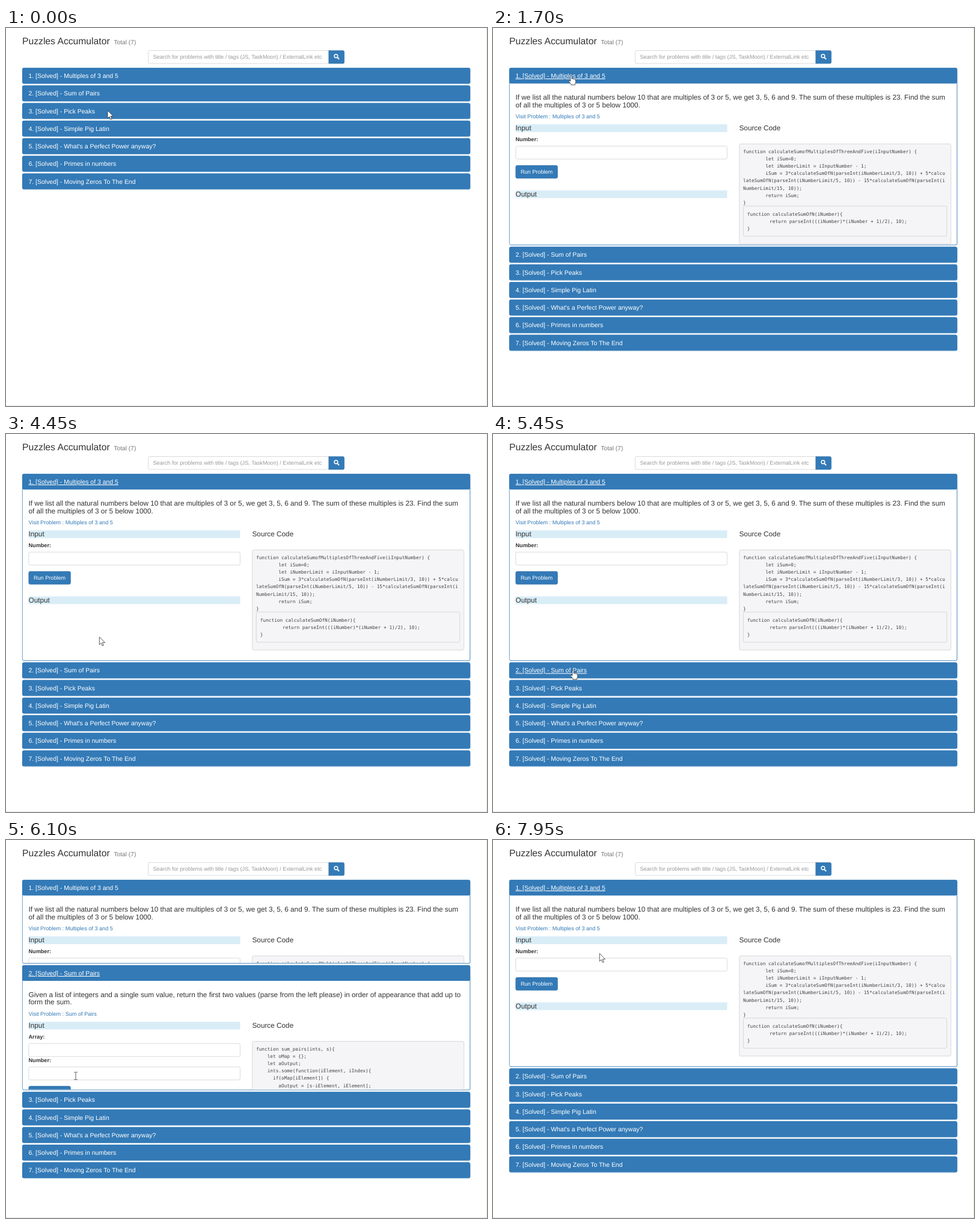
An HTML page that plays this animation: 800x628 px, repeating every 8 s.

```html
<!DOCTYPE html>
<html lang="en">
<head>
<meta charset="utf-8">
<title>Puzzles Accumulator</title>
<style>
html, body { margin: 0; width: 100%; height: 100%; overflow: hidden; background: #fff; }
svg { display: block; }
text { font: 9.15px "Liberation Sans", Arial, sans-serif; fill: #333; white-space: pre; text-rendering: geometricPrecision; }
.big { font-size: 15.7px; }
.small { font-size: 10.2px; fill: #777; }
.hint { fill: #999; }
.head { font-size: 10.46px; fill: #fff; }
.lead { font-size: 11.77px; }
.link { fill: #337ab7; }
.label { font-weight: bold; }
.white { fill: #fff; text-anchor: middle; }
.code { font: 7.76px "DejaVu Sans Mono", monospace; fill: #444; }
.field { fill: #fff; stroke: #ccc; stroke-width: .7; }
.pre { fill: #f5f4f6; stroke: #ccc; stroke-width: .7; }
.blue { fill: #337ab7; stroke: #2e6da4; stroke-width: .6; }
.shade { fill: #bfd2e4; }
.panel { fill: #fff; stroke: #337ab7; stroke-width: .7; }
.bar { fill: #337ab7; }
.band { fill: #d9edf7; }
.cursor path { fill: #fff; stroke: #333; stroke-width: .8; stroke-linejoin: round; }
</style>
</head>
<body>
<svg id="stage" width="800" height="628" viewBox="0 0 800 628"></svg>
<script>
const TOP = 66.2, PITCH = 29.25, BAR = 26, LINE = 12.14, LOOP = 8000;

const text = (x, y, cls, s) => `<text x="${x}" y="${y}" class="${cls}">${s}</text>`;
const rect = (x, y, w, h, cls, r = 2.6) =>
  `<rect x="${x}" y="${y}" width="${w}" height="${h}" rx="${r}" class="${cls}"/>`;
const code = (x, y, src) =>
  src.split("\n").map((s, i) => text(x, y + i * LINE, "code", s)).join("");

function body(name, lead, labels, source) {
  const drop = (labels.length - 1) * 38.7;
  return lead.map((s, i) => text(37.5, 118.6 + i * 12.9, "lead", s)).join("") +
    text(37.5, 149.6, "link", "Visit Problem : " + name) +
    rect(37.5, 160, 352, 12.9, "band", 0) + text(37.5, 170.2, "lead", "Input") +
    text(409.5, 170.2, "lead", "Source Code") +
    labels.map((s, i) => text(37.5, 188.3 + i * 38.9, "label", s) +
      rect(37.8, 196.2 + i * 38.9, 351.6, 21.6, "field")).join("") +
    rect(37.8, 228.3 + drop, 69.6, 21.4, "blue") +
    text(72.6, 242.2 + drop, "white", "Run Problem") +
    rect(37.5, 269.7 + drop, 352, 12.9, "band", 0) +
    text(37.5, 279.9 + drop, "lead", "Output") + source;
}

const sumCode = rect(409.7, 192.6, 352, 166.4, "pre") + code(416, 207.9,
`function calculateSumofMultiplesOfThreeAndFive(iInputNumber) {
        let iSum=0;
        let iNumberLimit = iInputNumber - 1;
        iSum = 3*calculateSumOfN(parseInt(iNumberLimit/3, 10)) + 5*calcu
lateSumOfN(parseInt(iNumberLimit/5, 10)) - 15*calculateSumOfN(parseInt(i
NumberLimit/15, 10));
        return iSum;
}`) + rect(416.3, 295.8, 338.4, 50.2, "pre") + code(422.8, 311.9,
`function calculateSumOfN(iNumber){
        return parseInt(((iNumber)*(iNumber + 1)/2), 10);
}`);

const pairCode = rect(409.7, 192.6, 352, 182.5, "pre") + code(416, 207.9,
`function sum_pairs(ints, s){
    let oMap = {};
    let aOutput;
    ints.some(function(iElement, iIndex){
      if(oMap[iElement]) {
        aOutput = [s-iElement, iElement];
        return aOutput;
      } else {
        oMap[s-iElement] = 1;
      }
    });

    return aOutput;
}`);

const names = ["Multiples of 3 and 5", "Sum of Pairs", "Pick Peaks", "Simple Pig Latin",
  "What's a Perfect Power anyway?", "Primes in numbers", "Moving Zeros To The End"];
const bodies = [
  body(names[0], ["If we list all the natural numbers below 10 that are multiples of 3 or 5, we get 3, 5, 6 and 9. The sum of these multiples is 23. Find the sum",
    "of all the multiples of 3 or 5 below 1000."], ["Number:"], sumCode),
  body(names[1], ["Given a list of integers and a single sum value, return the first two values (parse from the left please) in order of appearance that add up to",
    "form the sum."], ["Array:", "Number:"], pairCode)
];
const fullHeight = [284.1, 300.1];

const shapes = {
  arrow: "M0 0V13L3 10.3L5 15L7 14.2L5 9.6H9.2Z",
  hand: "M-1.2 9.4V1.2A1.2 1.2 0 0 1 1.2 1.2V5.5Q3 4.6 3.6 6Q5.4 5.2 6 6.8Q7.6 6.4 7.6 8V10.5Q7.4 12.5 6.4 14V15.5H-.2V14.3L-4 9.5Q-4 7.6 -2.2 8.4Z",
  beam: "M-3 -5.6H-.7L0 -5L.7 -5.6H3M0 -5V6M-3 6.6H-.7L0 6L.7 6.6H3"
};

const stage = document.getElementById("stage");
stage.innerHTML =
  rect(798.6, 0, 1.4, 628, "", 0).replace("<rect", '<rect fill="#efefe2"') +
  rect(0, 627, 800, 1, "", 0).replace("<rect", '<rect fill="#e6e6e6"') +
  text(27, 27, "big", "Puzzles Accumulator") + text(179.5, 27, "small", "Total (7)") +
  rect(236.5, 37.5, 303, 21.4, "field") +
  `<svg width="526.5" height="628">${text(244.5, 51.2, "hint",
    "Search for problems with title / tags (JS, TaskMoon) / ExternalLink etc")}</svg>` +
  '<path class="blue" d="M536.8 37.4H560.2Q562.6 37.4 562.6 40V56.4Q562.6 59 560.2 59H536.8Z"/>' +
  '<g fill="none" stroke="#fff"><circle cx="548.9" cy="46.6" r="2.9" stroke-width="1.5"/>' +
  '<path d="M551.2 49L553.6 51.4" stroke-width="2" stroke-linecap="round"/></g>' +
  names.map((name, i) => `<g class="item">${rect(27.4, TOP + .9, 745.2, BAR, "shade")}
    ${rect(27.3, TOP + .3, 744.4, BAR, "panel")}${rect(27, TOP, 745, BAR, "bar")}
    <svg width="800" height="0">${bodies[i] || ""}</svg>
    ${text(37.5, 83, "head", `${i + 1}. [Solved] - ${name}`)}</g>`).join("") +
  '<g class="cursor"><path/></g>';

const items = [...stage.querySelectorAll(".item")].map(g => {
  const [shade, frame, bar] = g.querySelectorAll("rect");
  return { g, shade, frame, bar, clip: g.querySelector("svg"), head: g.querySelector(".head") };
});
const cursor = stage.querySelector(".cursor"), pointer = cursor.firstChild;

// cubic-bezier(.25, .1, .25, 1)
function ease(x) {
  if (x <= 0) return 0;
  if (x >= 1) return 1;
  const curve = (s, a, b) => 3 * (1 - s) * (1 - s) * s * a + 3 * (1 - s) * s * s * b + s ** 3;
  let lo = 0, hi = 1;
  for (let i = 0; i < 24; i++) {
    const mid = (lo + hi) / 2;
    if (curve(mid, .25, .25) < x) lo = mid; else hi = mid;
  }
  return curve(lo, .1, 1);
}

function openness(t) {
  if (t < 1400) return [0, 0];
  if (t < 5880) return [ease((t - 1170) / 750), 0];
  const swap = t < 7300 ? ease((t - 5880) / 630) : 1 - ease((t - 7230) / 600);
  return [1 - swap, swap];
}

// time, x, y, shape
const moves = [
  [0, 169, 137, "arrow"], [200, 169, 137, "arrow"], [600, 159, 95, "arrow"],
  [750, 144, 65, "arrow"], [850, 136, 73, "hand"], [1050, 130, 79, "hand"],
  [2100, 130, 79, "hand"], [2150, 270, 180, "arrow"], [2200, 400, 276, "arrow"],
  [2450, 400, 276, "arrow"], [2500, 401, 250, "arrow"], [2600, 401, 250, "arrow"],
  [2800, 504.5, 234, "arrow"], [3000, 515, 229, "arrow"], [3450, 303, 222, "arrow"],
  [3700, 303, 222, "arrow"], [4300, 158, 327, "arrow"], [4400, 158, 327, "arrow"],
  [4450, 155.3, 337, "arrow"], [4700, 151, 388, "hand"], [4950, 150, 393, "hand"],
  [5050, 150, 393, "hand"], [5850, 116.3, 391.5, "hand"], [5950, 116.3, 391.5, "beam"],
  [6450, 115.3, 391.3, "arrow"], [7299, 115.3, 391.3, "arrow"], [7300, 150, 76, "hand"],
  [7450, 154, 84, "arrow"], [7800, 176.5, 186.5, "arrow"], [7900, 176.5, 186.5, "arrow"],
  [7950, 177.3, 188.5, "arrow"], [LOOP, 177.3, 188.5, "arrow"]
];

function draw(t) {
  const open = openness(t);
  const lined = [t >= 800 && t < 5880 || t >= 7300, t >= 4700 && t < 7300];
  let y = 0;
  items.forEach((it, i) => {
    const h = (open[i] || 0) * (fullHeight[i] || 0);
    it.g.setAttribute("transform", `translate(0 ${y})`);
    it.shade.setAttribute("height", BAR + h);
    it.frame.setAttribute("height", BAR - .3 + h);
    it.clip.setAttribute("height", h > 0 ? TOP + BAR + h - .8 : 0);
    it.head.style.textDecoration = lined[i] ? "underline" : "none";
    y += PITCH + h;
  });

  const n = moves.findIndex(m => m[0] > t), [t0, x0, y0, shape] = moves[n - 1], [t1, x1, y1] = moves[n];
  const k = (t - t0) / (t1 - t0);
  cursor.setAttribute("transform", `translate(${x0 + (x1 - x0) * k} ${y0 + (y1 - y0) * k})`);
  pointer.setAttribute("d", shapes[shape]);
  pointer.style.fill = shape === "beam" ? "none" : "#fff";
}

function tick() {
  draw(Math.floor(performance.now() % LOOP / 50) * 50);
  requestAnimationFrame(tick);
}
tick();
</script>
</body>
</html>
```
